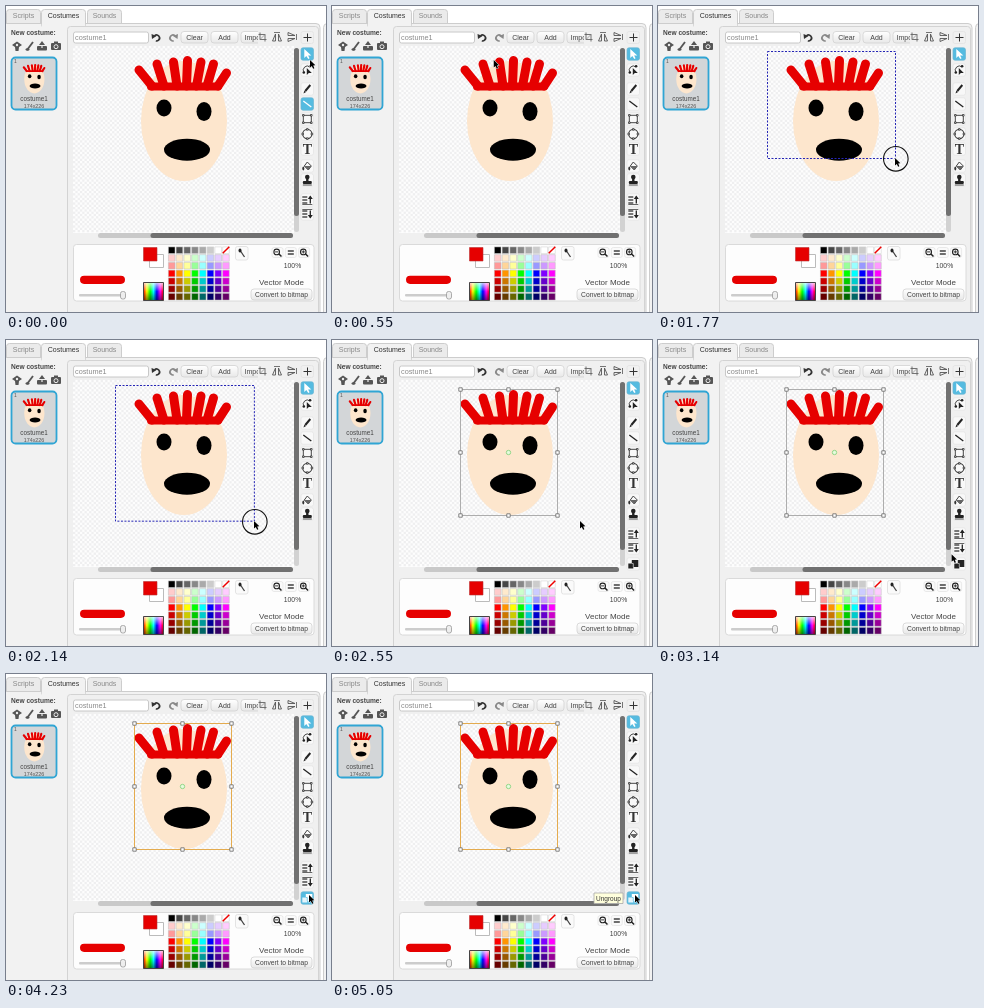
Recreate the animation shown at these times as an HTML page with a canvas. Size 320 px wide and 306 px high, loop 5100 ms.

```html
<!DOCTYPE html>
<html lang="en">
<head>
<meta charset="utf-8">
<title>Costume editor</title>
<style>
html, body { margin: 0; width: 100%; height: 100%; overflow: hidden; background: #fff; }
canvas { display: block; width: 320px; height: 306px; }
</style>
</head>
<body>
<canvas id="stage"></canvas>
<script>
const LOOP = 5100, W = 320, H = 306;
const PRESSES = [[90, 240], [1180, 2230], [3560, 3850]];
const DRAG = PRESSES[1], GROUPED = 3830, TIP = 4350;
const HOME = { x: 109, y: 45 };
const PATH = [
  [0, 304, 54], [270, 304, 54], [550, 162, 54], [850, 109, 45],
  [1190, 109, 45], [1360, 182, 69], [1720, 237, 152], [1820, 237, 152],
  [2120, 248, 181], [2780, 248, 181], [3270, 303, 221], [LOOP, 303, 221]
];
const INK = '#222', RED = '#e60000';

const canvas = document.getElementById('stage');
const g = canvas.getContext('2d');
const dpr = window.devicePixelRatio || 1;
canvas.width = W * dpr;
canvas.height = H * dpr;

function fillBox(x, y, w, h, color, r = 0) {
  g.fillStyle = color;
  g.beginPath();
  g.roundRect(x, y, w, h, r);
  g.fill();
}

function strokeBox(x, y, w, h, color, r = 0, lw = 1) {
  g.strokeStyle = color;
  g.lineWidth = lw;
  g.beginPath();
  g.roundRect(x, y, w, h, r);
  g.stroke();
}

function panel(x, y, w, h, fill, edge, r = 0, lw = 1) {
  fillBox(x, y, w, h, fill, r);
  strokeBox(x, y, w, h, edge, r, lw);
}

function line(points, color = INK, lw = 1) {
  g.strokeStyle = color;
  g.lineWidth = lw;
  g.beginPath();
  for (let i = 0; i < points.length; i += 2) g.lineTo(points[i], points[i + 1]);
  g.stroke();
}

function shape(points, color = INK) {
  g.fillStyle = color;
  g.beginPath();
  for (let i = 0; i < points.length; i += 2) g.lineTo(points[i], points[i + 1]);
  g.fill();
}

function oval(x, y, rx, ry, color) {
  g.fillStyle = color;
  g.beginPath();
  g.ellipse(x, y, rx, ry, 0, 0, 7);
  g.fill();
}

function ring(x, y, r, color = INK, lw = 1, from = 0, to = Math.PI * 2) {
  g.strokeStyle = color;
  g.lineWidth = lw;
  g.beginPath();
  g.arc(x, y, r, from, to);
  g.stroke();
}

function text(s, x, y, size, color = '#444', align = 'left', weight = '') {
  g.font = `${weight} ${size}px "Liberation Sans", Arial, sans-serif`;
  g.fillStyle = color;
  g.textAlign = align;
  g.fillText(s, x, y);
}

function at(x, y, draw) {
  g.save();
  g.translate(x, y);
  draw();
  g.restore();
}

// Monotone cubic through PATH: smooth travel, no overshoot at rests.
function slope(i, k) {
  if (i <= 0 || i >= PATH.length - 1) return 0;
  const [a, b, c] = [PATH[i - 1], PATH[i], PATH[i + 1]];
  const p = (b[k] - a[k]) / (b[0] - a[0]), q = (c[k] - b[k]) / (c[0] - b[0]);
  return p * q > 0 ? 2 * p * q / (p + q) : 0;
}

function pointer(t) {
  let i = 0;
  while (i < PATH.length - 2 && t >= PATH[i + 1][0]) i++;
  const a = PATH[i], b = PATH[i + 1], d = b[0] - a[0], u = (t - a[0]) / d;
  const e = u * u * (3 - 2 * u);
  const pos = k => a[k] + (b[k] - a[k]) * e
    + d * u * (1 - u) * ((1 - u) * slope(i, k) - u * slope(i + 1, k));
  return { x: pos(1), y: pos(2) };
}

function face() {
  oval(178, 115, 43, 60, '#fde6cd');
  const tips = [133, 64, 151, 58, 167.5, 56, 181.5, 54.5, 195, 56, 207.5, 58, 220.5, 67];
  const roots = [146, 158, 171, 180.5, 190.5, 201, 212];
  g.lineCap = 'round';
  roots.forEach((x, i) => line([tips[2 * i], tips[2 * i + 1], x, 80], RED, 9));
  line([145, 80.5, 212, 80.5], RED, 8);
  g.lineCap = 'butt';
  oval(158, 102, 7.5, 8.5, '#000');
  oval(198, 105.5, 7.5, 9.5, '#000');
  oval(181, 143.7, 23, 11, '#000');
}

function tab(label, x, w, active) {
  panel(x + .5, 3.5, w, 18, active ? '#f2f2f2' : '#ebebeb', '#cdcdcd', 3);
  text(label, x + w / 2 + .5, 12, 7, active ? '#333' : '#888', 'center');
}

function button(label, x, y, w, h, size) {
  const fade = g.createLinearGradient(0, y, 0, y + h);
  fade.addColorStop(0, '#fff');
  fade.addColorStop(1, '#e8e8e8');
  panel(x, y, w, h, fade, '#d2d2d2', 3, .8);
  text(label, x + w / 2, y + h / 2 + size * .36, size, '#444', 'center');
}

function tabs() {
  fillBox(0, 0, W, H, '#fff');
  tab('Scripts', 0, 34, false);
  tab('Sounds', 81, 34, false);
  panel(-5, 17.5, 319, 300, '#f2f2f2', '#cdcdcd', 4);
  panel(317.5, 17.5, 20, 300, '#f2f2f2', '#cdcdcd', 4);
  tab('Costumes', 35, 44, true);
  fillBox(36, 17, 43, 6, '#f2f2f2');
}

function costumeList() {
  text('New costume:', 5, 28.8, 6.6, '#444', 'left', 'bold');
  const c = '#555';
  at(11, 40, () => {
    shape([-5, -1, 0, -4.5, 5, -1, 2, 1, 1.5, 5, -1.5, 5, -2, 1], c);
    oval(0, -1, 1.2, 1.2, '#eee');
  });
  at(24, 40, () => {
    line([-3, 4, 3, -4], c, 1.8);
    oval(-2.5, 3.5, 2, 1.3, c);
  });
  at(36, 40, () => {
    fillBox(-5, 0, 10, 4.5, c, 1);
    shape([-3, -1, 0, -5, 3, -1], c);
    line([0, -1, 0, 2], '#eee', 1.2);
  });
  at(50, 40, () => {
    fillBox(-5, -3, 10, 7, c, 1);
    fillBox(-2, -4.5, 4, 2, c);
    ring(0, .7, 2, '#eee', 1);
  });
  panel(5.5, 51.5, 45, 52, '#d3d6d8', '#30a5d4', 4, 1.8);
  text('1', 8, 57, 5, '#555');
  at(28, 58, () => {
    g.scale(.235, .235);
    g.translate(-176.5, -50);
    face();
  });
  text('costume1', 28, 94.7, 6.3, '#444', 'center');
  text('174x226', 28, 101.5, 5.4, '#555', 'center');
}

function toolbar() {
  panel(67.5, 26, 75, 11, '#fff', '#c8c8c8', 2);
  text('costume1', 69, 34, 7.3, '#8a8a8a');
  for (const [x, s] of [[150.5, 1], [167, -1]]) at(x, 31, () => {
    g.scale(s, 1);
    ring(0, 1, 3, s > 0 ? '#333' : '#888', 1.7, -2.3, 1.8);
    shape([-5, -3, -4.5, 2, 0, -1], s > 0 ? '#333' : '#888');
  });
  button('Clear', 175, 25.5, 27, 11.5, 7);
  button('Add', 205, 25.5, 27, 11.5, 7);
  g.save();
  g.beginPath();
  g.rect(230, 22, 22, 18);
  g.clip();
  button('Import', 235, 25.5, 27, 11.5, 7);
  g.restore();
  at(256.5, 31, () => {
    line([-4, -2.5, 2.5, -2.5, 2.5, 4.5], '#666', .9);
    line([-2.5, -4.5, -2.5, 2.5, 4, 2.5], '#666', .9);
    line([-2.5, 2.5, 3, -3], '#888', .7);
  });
  for (const [x, turn] of [[271, 0], [286, Math.PI / 2]]) at(x, 31, () => {
    g.rotate(turn);
    for (const s of [-1, 1]) line([s * 1.5, -3, s * 1.5, 4, s * 4.5, 4, s * 1.5, -3], '#555', .9);
    line([-3, -4.5, 3, -4.5], '#555', .8);
  });
  strokeBox(295, 25.5, 12.5, 12, '#e2e2e2', 2, .8);
  line([297.5, 31.5, 305.5, 31.5], '#333', 1);
  line([301.5, 27.5, 301.5, 35.5], '#333', 1);
}

function artboard() {
  const cell = 2.3;
  fillBox(67, 40, 221, 187, '#fdfdfd');
  g.fillStyle = '#efeff0';
  for (let r = 0; r < 81; r++) {
    for (let c = r % 2; c < 96; c += 2) g.fillRect(67 + c * cell, 40 + r * cell, cell, cell);
  }
  fillBox(288, 42, 5, 184, '#d2d2d2', 2.5);
  fillBox(288, 42, 5, 168, '#717171', 2.5);
  fillBox(92, 227, 195, 5, '#c9c9c9', 2.5);
  fillBox(144.5, 227, 142.5, 5, '#717171', 2.5);
}

function palette() {
  const hues = [0, 35, 60, 120, 180, 240, 270, 300];
  const lights = [90, 80, 50, 40, 30, 20];
  const grays = [0, 70, 102, 136, 170, 204, 255];
  for (let r = 0; r < 7; r++) for (let c = 0; c < 8; c++) {
    const x = 162 + c * 7.75, y = 240.5 + r * 7.75;
    const gray = c < 7 ? grays[c] : 255;
    const fill = r ? `hsl(${hues[c]} 100% ${lights[r - 1]}%)` : `rgb(${gray},${gray},${gray})`;
    panel(x + .4, y + .4, 6.6, 6.6, fill, r ? '#bbb' : '#ccc', 0, .5);
  }
  line([216.7, 247.3, 223.3, 240.7], '#e00', 1.5);
}

function hueBox() {
  const x = 137.5, y = 276.5, w = 20, h = 18;
  const hue = g.createLinearGradient(x, 0, x + w, 0);
  for (let i = 0; i <= 6; i++) hue.addColorStop(i / 6, `hsl(${i * 60} 100% 50%)`);
  const shade = g.createLinearGradient(0, y, 0, y + h);
  shade.addColorStop(0, 'rgba(255,255,255,.8)');
  shade.addColorStop(.5, 'rgba(255,255,255,0)');
  shade.addColorStop(.5, 'rgba(0,0,0,0)');
  shade.addColorStop(1, 'rgba(0,0,0,.5)');
  fillBox(x, y, w, h, hue);
  panel(x, y, w, h, shade, '#444');
}

function settings() {
  panel(67.5, 238.5, 240.5, 56.5, '#fdfdfd', '#dadada', 3);
  fillBox(74, 269.7, 45, 8.2, RED, 4.1);
  fillBox(73, 288, 45, 2.5, '#ccc', 1);
  panel(114.5, 285.5, 5, 7.5, '#eee', '#999', 2, .8);
  panel(143.5, 248.5, 14, 13, '#fff', '#bbb');
  panel(137.5, 241.5, 13.5, 13.5, RED, '#b33', 0, .6);
  hueBox();
  palette();
  panel(229.5, 240.5, 12.5, 13.5, '#fafafa', '#ddd', 2, .8);
  line([233.5, 243.5, 238.5, 251], '#444', 1.3);
  oval(234, 244.5, 1.5, 2, '#222');
  for (let i = 0; i < 3; i++) {
    const x = 271.5 + i * 13.3, y = 246.5;
    panel(x - 5.5, y - 5, 11, 10, '#fafafa', '#e2e2e2', 2, .7);
    if (i === 1) {
      line([x - 3, y - 1.5, x + 3, y - 1.5], INK, 1.3);
      line([x - 3, y + 1.5, x + 3, y + 1.5], INK, 1.3);
      continue;
    }
    ring(x - .8, y - .6, 2.8, INK, 1.1);
    line([x + 1.2, y + 1.2, x + 4, y + 4], INK, 1.5);
    line([x - 2.4, y - .6, x + .8, y - .6], INK, .9);
    if (i) line([x - .8, y - 2.2, x - .8, y + 1], INK, .9);
  }
  text('100%', 286.5, 262, 6.8, '#444', 'center');
  text('Vector Mode', 275.5, 278.5, 8, '#444', 'center');
  button('Convert to bitmap', 245, 283, 61, 11, 6.7);
}

function layers(dir) {
  for (let i = -1; i < 2; i++) line([-5, i * 3, 0, i * 3], INK, 1.2);
  line([-5, dir * 4.5, 5, dir * 4.5], '#555', .9);
  line([3, -3.5, 3, 3.5], INK, 1.3);
  shape([.5, -dir * 1, 5.5, -dir * 1, 3, -dir * 4.5]);
}

function knobs(rx, ry, diagonal) {
  for (const s of [-1, 1]) for (const q of [-1, 1]) {
    const x = diagonal ? s * rx : (s + q) / 2 * rx;
    const y = diagonal ? q * ry : (s - q) / 2 * ry;
    panel(x - .8, y - .8, 1.6, 1.6, '#fff', INK, 0, .7);
  }
}

const TOOLS = [
  [48, () => shape([-3, -5, -3, 4, -1, 2, 1, 5, 2.3, 4.3, .8, 1.5, 4, 1.5], '#fff')],
  [64, () => {
    shape([-.5, -2, -.5, 5, 1.5, 3, 4.5, 3]);
    ring(0, 0, 4, '#444', 1, 2.4, 5.4);
    oval(-3.5, 2.5, 1.3, 1.3, INK);
    oval(2.8, -3.8, 1.3, 1.3, INK);
  }],
  [83, () => {
    line([-2, 2, 3, -4], INK, 2);
    shape([-3.8, 4.6, -2.9, 1.4, -1.2, 2.9]);
  }],
  [98, () => line([-4, -3, 4, 3], INK, 1.3)],
  [113, () => {
    strokeBox(-4, -3.7, 8, 7.4, '#444', 0, 1);
    knobs(4, 3.7, true);
  }],
  [128, () => {
    ring(0, 0, 4.6, '#444', 1.1);
    knobs(4.6, 4.6, false);
  }],
  [143, () => {
    g.font = 'bold 14px "Liberation Serif", "Noto Serif", serif';
    g.textAlign = 'center';
    g.fillStyle = '#333';
    g.fillText('T', 0, 5);
  }],
  [160, () => {
    line([-3, 0, 0, -4, 4, 0, 1, 4, -3, 0], '#444', 1);
    shape([-3, 0, 4, 0, 1, 4], '#666');
    oval(-4, 2.5, 1, 2, '#333');
  }],
  [174, () => {
    oval(0, -3, 2.3, 2.3, INK);
    fillBox(-1.2, -2, 2.4, 4, INK);
    fillBox(-4.5, 1, 9, 3, INK, 1);
    line([-4.5, 5, 4.5, 5], INK, .8);
  }],
  [194, () => layers(1)],
  [208, () => layers(-1)],
  [224, lit => {
    fillBox(-1.5, -4, 6.5, 7, lit ? '#fff' : INK);
    fillBox(-5, -.5, 5, 5, lit ? '#e4f4fb' : INK);
    line([-1.5, -.5, 0, -.5, 0, 3], lit ? '#55bbe0' : '#ddd', .7);
  }]
];

function tools(t, mouse) {
  const arranged = t < DRAG[0] || t >= DRAG[1];
  const selected = t < 130 ? 3 : 0;
  TOOLS.forEach(([y, draw], i) => {
    if (i > 8 && !arranged || i === 11 && t < DRAG[1]) return;
    const over = mouse.x > 294 && Math.abs(mouse.y - y) < 7;
    const lit = i === selected || over;
    panel(295, y - 6.2, 12.5, 12.4, lit ? '#55bbe0' : '#f8f8f8', lit ? '#6bb5d2' : '#e2e2e2', 2, .7);
    at(301.3, y, () => {
      if (i === 3 && lit) line([-4, -3, 4, 3], '#fff', 1.3);
      else draw(lit);
    });
  });
}

function marquee(t) {
  const end = pointer(Math.max(DRAG[0], t - 40));
  g.setLineDash([2, 1.5]);
  strokeBox(HOME.x + .5, HOME.y + .5, end.x - HOME.x, end.y - HOME.y, '#2525b5');
  g.setLineDash([]);
}

function selection(grouped) {
  const xs = [128.5, 176.5, 225.5], ys = [49.5, 112.5, 175.5];
  strokeBox(xs[0], ys[0], 97, 126, grouped ? '#e2a33c' : '#a5a5a5', 0, .9);
  for (const x of xs) for (const y of ys) {
    if (x === xs[1] && y === ys[1]) {
      oval(x, y, 2.2, 2.2, '#e5fbdc');
      ring(x, y, 2.2, '#7fd078', .8);
    } else panel(x - 1.7, y - 1.7, 3.4, 3.4, '#fff', '#666', 0, .8);
  }
}

function cursor(mouse, pressed) {
  at(mouse.x, mouse.y, () => {
    if (pressed) ring(.8, .8, 12.3, '#111', 1.1);
    const arrow = [0, 0, 0, 7.6, 1.8, 6, 3.1, 8.8, 4.4, 8.2, 3.2, 5.5, 5.4, 5.3, 0, 0];
    line(arrow, '#fff', 1);
    shape(arrow, '#000');
  });
}

function draw(t) {
  const mouse = pointer(t);
  g.setTransform(dpr, 0, 0, dpr, 0, 0);
  tabs();
  costumeList();
  panel(61.5, 20.5, 251, 300, '#f0f0f0', '#d3d3d3', 3);
  toolbar();
  artboard();
  face();
  settings();
  tools(t, mouse);
  if (t >= DRAG[0] && t < DRAG[1]) marquee(t);
  if (t >= DRAG[1]) selection(t >= GROUPED);
  if (t >= TIP) {
    panel(262, 219, 29, 10.5, '#ffffdc', '#aaa', 0, .8);
    text('Ungroup', 276.5, 226.6, 6.5, '#333', 'center');
  }
  cursor(mouse, PRESSES.some(([a, b]) => t >= a && t < b));
}

const start = performance.now();
function tick() {
  draw((performance.now() - start) % LOOP);
  requestAnimationFrame(tick);
}
tick();
</script>
</body>
</html>
```
